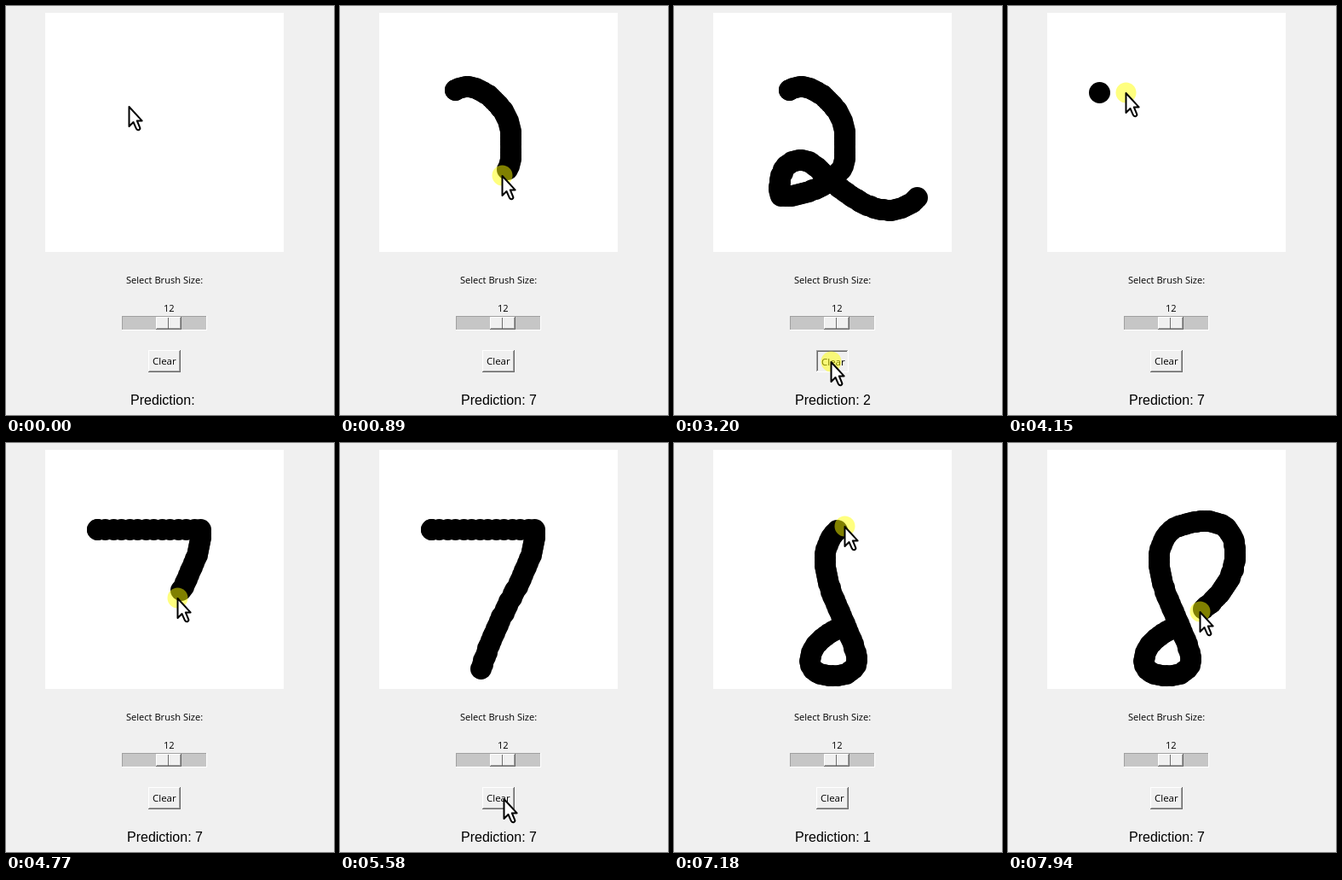
Recreate the animation shown at these times as an HTML page with a canvas. Size 385 by 479 pixels, loop 8000 ms.

```html
<!DOCTYPE html>
<html lang="en">
<head>
<meta charset="utf-8">
<title>Digit prediction</title>
<style>
  html, body { margin: 0; width: 100%; height: 100%; overflow: hidden; background: #f0f0f0; }
  svg, canvas { position: absolute; left: 0; top: 0; width: 385px; height: 479px; }
  .ui { font: 11.1px "Open Sans", "Noto Sans", sans-serif; }
  #clear .ui { font-size: 11.5px; }
  .result { font: 16px "Liberation Sans", Arial, sans-serif; }
  .sunken, .down .raised { display: none; }
  .down .sunken { display: inline; }
  .down text { transform: translate(1px, 1px); }
</style>
</head>
<body>
<svg viewBox="0 0 385 479" shape-rendering="crispEdges">
  <rect x="46" y="8" width="280" height="280" fill="#fff"/>
  <text class="ui" x="141" y="325">Select Brush Size:</text>
  <text class="ui" x="185" y="358">12</text>

  <g id="slider">
    <path d="M136 363h100v17h-100z" fill="#fff"/>
    <path d="M136 363h99v16h-99z" fill="#a0a0a0"/>
    <path d="M137 364h98v15h-98z" fill="#c6c6c6"/>
    <path d="M176 364h30v15h-30z" fill="#696969"/>
    <path d="M176 364h29v14h-29z" fill="#fff"/>
    <path d="M177 365h28v13h-28z" fill="#a0a0a0"/>
    <path d="M177 365h27v12h-27z" fill="#f0f0f0"/>
    <path d="M190 365h1v13h-1z" fill="#696969"/>
    <path d="M191 365h1v12h-1z" fill="#fff"/>
  </g>

  <g id="clear">
    <g class="raised">
      <path d="M167 403h38v26h-38z" fill="#696969"/>
      <path d="M167 403h37v25h-37z" fill="#fff"/>
      <path d="M168 404h36v24h-36z" fill="#a0a0a0"/>
      <path d="M168 404h35v23h-35z" fill="#f0f0f0"/>
    </g>
    <g class="sunken">
      <path d="M167 403h38v26h-38z" fill="#fff"/>
      <path d="M167 403h37v25h-37z" fill="#a0a0a0"/>
      <path d="M168 404h36v24h-36z" fill="#f0f0f0"/>
      <path d="M168 404h35v1h-34v22h-1z" fill="#696969"/>
    </g>
    <text class="ui" x="172" y="420">Clear</text>
  </g>

  <text class="result" id="result" x="146" y="467">Prediction:</text>
</svg>
<canvas id="stage" width="385" height="479"></canvas>

<script>
const LOOP = 8000;
const MARK_EVERY = 16;
const CANVAS_BOTTOM = 288;

const ctx = document.getElementById('stage').getContext('2d');
const clearButton = document.getElementById('clear');
const result = document.getElementById('result');
const arrow = new Path2D('M.5 1V24L5.5 19L9 26.8Q10.3 29 12.3 28Q14 27 13 25L9.8 17.4H15.6Z');

const legs = [];
const marks = [];
const presses = [];
const smooth = u => u * u * (3 - 2 * u);
const linear = u => u;
const latest = (list, t) => list.findLast(e => e.from <= t) || list[0];

function pointerAt(t) {
  const { from, to, path, length, ease } = latest(legs, t);
  const u = Math.min(1, Math.max(0, (t - from) / (to - from)));
  const p = path.getPointAtLength(length * ease(u));
  return { x: Math.round(p.x), y: Math.round(p.y) };
}

// Each leg continues from where the pointer last stopped
function move(from, to, d, ease = smooth) {
  const start = legs.length ? pointerAt(from) : { x: 144, y: 117 };
  const path = document.createElementNS('http://www.w3.org/2000/svg', 'path');
  path.setAttribute('d', `M${start.x} ${start.y}${d}`);
  legs.push({ from, to, path, length: path.getTotalLength(), ease });
}

function draw(from, to, d, delay = 20) {
  move(from, to, d, linear);
  for (let t = from; t <= to; t += MARK_EVERY) {
    marks.push({ ...pointerAt(t), shown: t + delay });
  }
}

function press(from, to) {
  const p = pointerAt(from);
  const onButton = p.y > CANVAS_BOTTOM;
  presses.push({ from, to, onButton });
  if (!onButton) marks.push({ ...p, shown: from });
}

// Two
move(60, 200, 'L135 98');
press(210, 2120);
draw(330, 1710, 'C158 82 200 118 200 150V180C196 205 150 225 124 222' +
  'C121 195 130 180 150 180C166 180 176 204 218 229');
draw(1710, 1990, 'C238 240 268 246 286 222');
move(2330, 3070, 'Q215 355 184 416');
press(3200, 3400);

// Seven
move(3480, 3960, 'Q130 180 107 101');
press(4000, 5090);
draw(4098, 4302, 'H228', 60);
draw(4500, 5060, 'C230 145 190 185 165 264');
move(5100, 5570, 'C170 320 205 380 192 416');
press(5790, 5930);

// Eight, left open
move(5880, 6170, 'L200 215');
press(6200, LOOP);
draw(6220, 7180, 'C184 217 158 236 159 257C160 277 214 277 214 256' +
  'C214 225 175 175 177 135C177 115 188 101 200 97');
draw(7180, 7940, 'C222 88 267 83 266 129C267 160 242 185 225 197');

const predictions = [
  { from: 0, digit: '' },
  { from: 560, digit: '7' },
  { from: 1430, digit: '2' },
  { from: 4085, digit: '7' },
  { from: 6500, digit: '2' },
  { from: 6900, digit: '1' },
  { from: 7660, digit: '7' }
];

function disc({ x, y }, radius, color) {
  ctx.fillStyle = color;
  ctx.beginPath();
  ctx.arc(x + 0.5, y + 0.5, radius, 0, Math.PI * 2);
  ctx.fill();
}

function drawArrow({ x, y }) {
  ctx.save();
  ctx.translate(x, y);
  ctx.fillStyle = '#fff';
  ctx.fill(arrow);
  ctx.lineWidth = 2;
  ctx.lineJoin = 'round';
  ctx.strokeStyle = '#000';
  ctx.stroke(arrow);
  ctx.restore();
}

function render(t) {
  const pointer = pointerAt(t);
  const held = presses.find(p => t >= p.from && t < p.to);
  const cleared = presses.findLast(p => p.onButton && p.to <= t)?.to ?? 0;

  ctx.clearRect(0, 0, 385, 479);
  for (const m of marks) {
    if (m.shown > cleared && m.shown <= t) disc(m, 12.5, '#000');
  }
  if (held) disc(pointer, 12, 'rgba(255, 255, 0, 0.5)');
  drawArrow(pointer);

  clearButton.classList.toggle('down', Boolean(held?.onButton));
  const { digit } = latest(predictions, t);
  result.textContent = `Prediction: ${digit}`.trim();
  result.setAttribute('x', digit ? 142 : 146);
}

function frame() {
  render(performance.now() % LOOP);
  requestAnimationFrame(frame);
}
frame();
</script>
</body>
</html>
```
